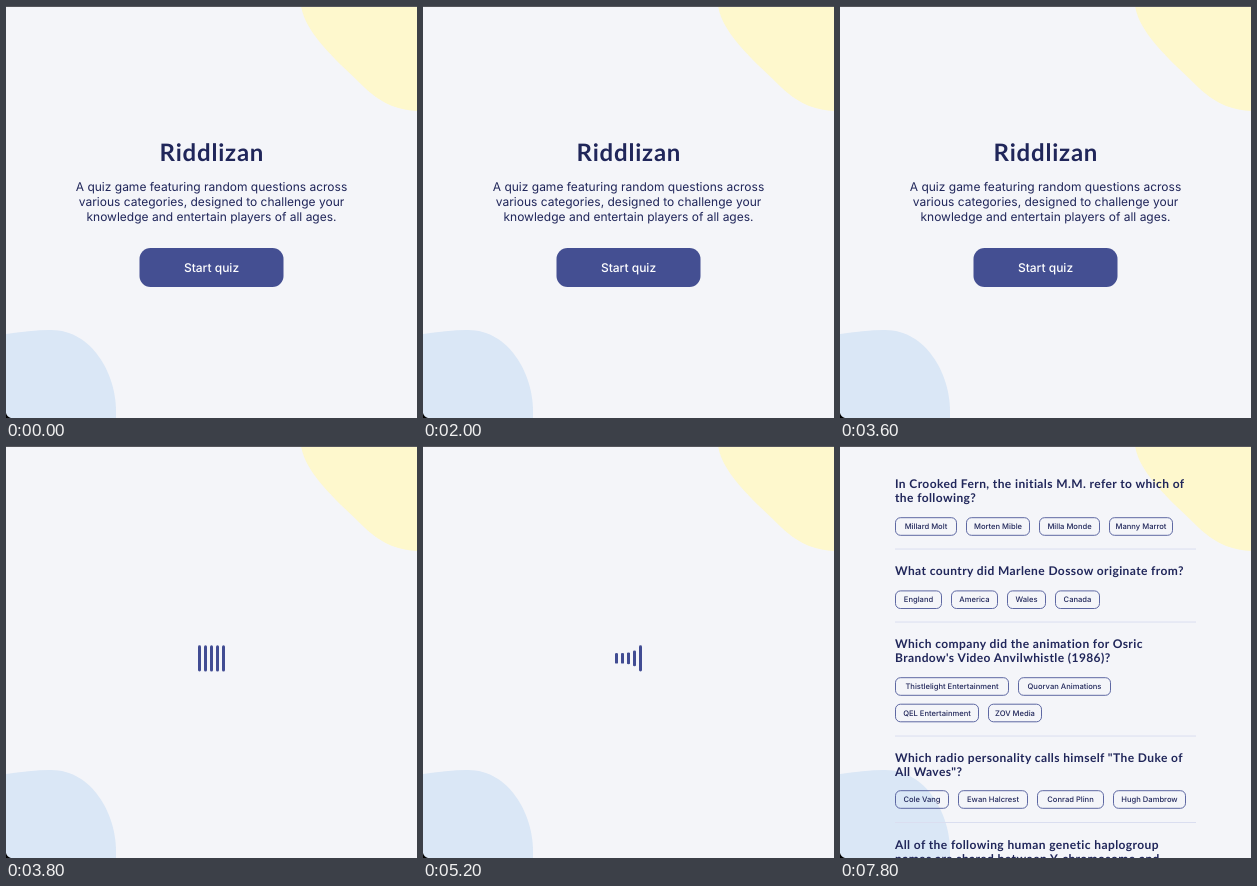
Write an HTML page that moves like this. It is 411 by 412 pixels and loops after 8 s.

```html
<!DOCTYPE html>
<html lang="en">
<head>
<meta charset="utf-8">
<title>Quiz</title>
<style>
html, body { margin: 0; width: 100%; height: 100%; overflow: hidden; background: #f4f5f9; }
svg { display: block; width: 100%; height: 100%; }
text { fill: #20265a; font-family: Inter, sans-serif; text-rendering: geometricPrecision; }
.mid { text-anchor: middle; }
.title { font: 700 24px Lato, sans-serif; letter-spacing: .8px; }
.intro { font-size: 12px; }
.start { font-size: 12px; font-weight: 500; fill: #fff; }
.ask { font: 700 12px Lato, sans-serif; letter-spacing: .4px; }
.opt { font-size: 7.6px; font-weight: 500; }
.pill { fill: none; stroke: #4d5899; stroke-width: .9; }
.rule { stroke: #dadef0; stroke-width: 1; }
</style>
</head>
<body>
<svg viewBox="0 0 411 412">
  <rect width="411" height="412" fill="#f4f5f9"/>
  <path fill="#fef8cd" d="M295 0C300 30 335 58 359 82C378 100 395 104 411 105V0Z"/>
  <path fill="#dae7f6" d="M0 328C15 326 30 324 45 324C86 324 110 368 110 405V412H0Z"/>
  <g id="home">
    <text class="mid title" x="205.9" y="155.3">Riddlizan</text>
    <g class="mid intro">
      <text x="205.5" y="185.3">A quiz game featuring random questions across</text>
      <text x="205.5" y="200.3">various categories, designed to challenge your</text>
      <text x="205.5" y="215.3">knowledge and entertain players of all ages.</text>
    </g>
    <rect x="133.5" y="242" width="144" height="39" rx="11" fill="#444f92"/>
    <text class="mid start" x="205.5" y="266">Start quiz</text>
  </g>
  <g id="loader" fill="#414c93"></g>
  <g id="quiz"></g>
  <rect width="411" height="1" fill="#55565c"/>
  <path d="M0 407Q1 411 5 412H0Z"/>
</svg>
<script>
const LOOP = 8000, LOAD = 3800, QUIZ = 5400;
const $ = id => document.getElementById(id);

function add(parent, tag, attrs, label) {
  const el = document.createElementNS(parent.namespaceURI, tag);
  for (const k in attrs) el.setAttribute(k, attrs[k]);
  if (label) el.textContent = label;
  parent.appendChild(el);
  return el;
}

// Each option: label, left, right, vertical centre
const questions = [
  { y: 42, lines: ['In Crooked Fern, the initials M.M. refer to which of', 'the following?'], rule: 103,
    opts: [['Millard Molt', 55, 117, 80.5], ['Morten Mible', 126, 190, 80.5],
           ['Milla Monde', 199, 260, 80.5], ['Manny Marrot', 269, 333, 80.5]] },
  { y: 129, lines: ['What country did Marlene Dossow originate from?'], rule: 176,
    opts: [['England', 55, 102, 153.7], ['America', 111, 158, 153.7],
           ['Wales', 167, 206, 153.7], ['Canada', 215, 260, 153.7]] },
  { y: 202, lines: ['Which company did the animation for Osric', "Brandow's Video Anvilwhistle (1986)?"], rule: 290,
    opts: [['Thistlelight Entertainment', 55, 169, 240.5], ['Quorvan Animations', 178, 271, 240.5],
           ['QEL Entertainment', 55, 139, 267], ['ZOV Media', 148, 202, 267]] },
  { y: 315.7, lines: ['Which radio personality calls himself "The Duke of', 'All Waves"?'], rule: 376.5,
    opts: [['Cole Vang', 55, 109, 353.5], ['Ewan Halcrest', 118, 188, 353.5],
           ['Conrad Plinn', 197, 264, 353.5], ['Hugh Dambrow', 273, 346, 353.5]] },
  { y: 402.7, lines: ['All of the following human genetic haplogroup', 'names are shared between Y-chromosome and'], opts: [] }
];

for (const q of questions) {
  q.lines.forEach((s, i) => add($('quiz'), 'text', { class: 'ask', x: 55, y: q.y + i * 14.3 }, s));
  for (const [s, l, r, y] of q.opts) {
    add($('quiz'), 'rect', { class: 'pill', x: l + .5, y: y - 8.8, width: r - l - 1, height: 17.6, rx: 5 });
    add($('quiz'), 'text', { class: 'mid opt', x: (l + r) / 2, y: y + 2.7 }, s);
  }
  if (q.rule) add($('quiz'), 'path', { class: 'rule', d: `M55 ${q.rule}H356` });
}

const bars = [0, 1, 2, 3, 4].map(i =>
  add($('loader'), 'rect', { x: 192 + 6 * i, y: -13.15, width: 3, height: 26.3, rx: 1.5 }));

const curve = (a, b, u) => 3 * a * u * (1 - u) ** 2 + 3 * b * u * u * (1 - u) + u ** 3;

function ease(x) {
  let lo = 0, hi = 1;
  for (let i = 0; i < 24; i++) {
    const m = (lo + hi) / 2;
    if (curve(.2, .18, m) < x) lo = m; else hi = m;
  }
  return curve(.68, 1.08, lo);
}

// Shrink to 0.4 over half a second, then grow back
function barScale(ms) {
  if (ms <= 0) return 1;
  const p = ms % 1000 / 500;
  return p < 1 ? 1 - .6 * ease(p) : .4 + .6 * ease(p - 1);
}

function show(id, on) { $(id).style.display = on ? '' : 'none'; }

function draw(t) {
  show('home', t < LOAD);
  show('loader', t >= LOAD && t < QUIZ);
  show('quiz', t >= QUIZ);
  bars.forEach((b, i) =>
    b.setAttribute('transform', `translate(0 212.3) scale(1 ${barScale(t - LOAD - 100 * i)})`));
}

const begin = performance.now();
function tick() {
  draw((performance.now() - begin) % LOOP);
  requestAnimationFrame(tick);
}
tick();
</script>
</body>
</html>
```
